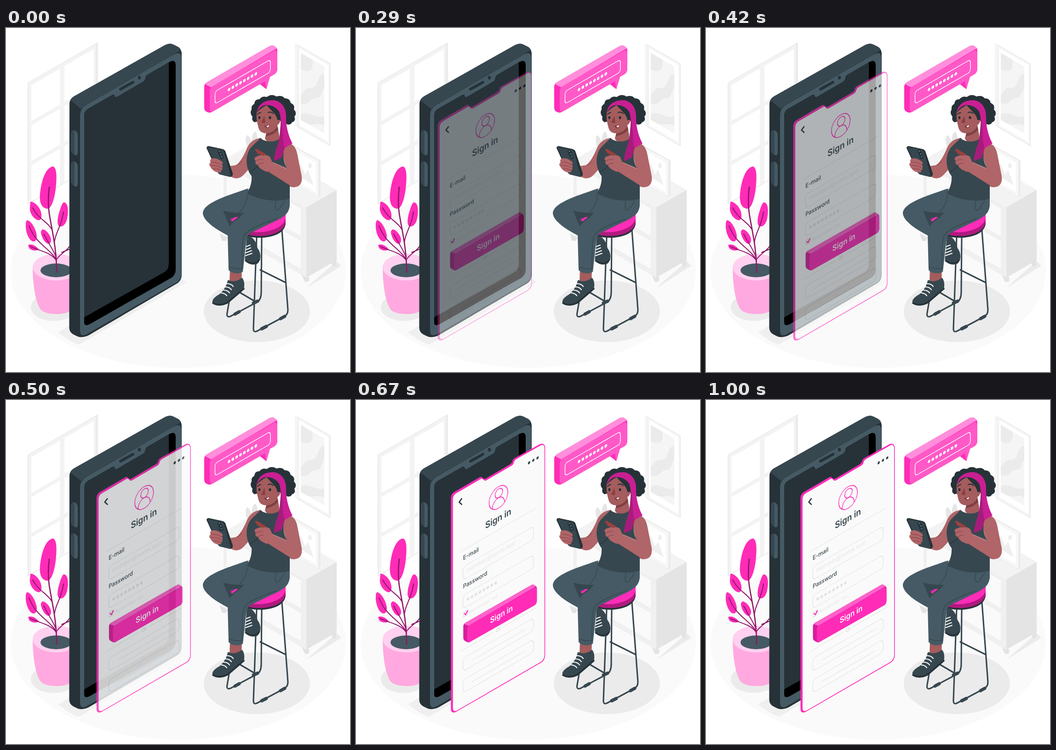
Write an HTML page that moves like this. It is 748 by 748 pixels and loops after 1040 ms.

```html
<!DOCTYPE html>
<html lang="en">
<head>
<meta charset="utf-8">
<title>Sign in</title>
<style>
html, body { margin: 0; width: 100%; height: 100%; overflow: hidden; background: #fff; }
svg { display: block; width: 100vw; height: 100vh; }
text { font-family: Inter, Roboto, sans-serif; }
.line { fill: none; stroke-linecap: round; stroke-linejoin: round; }
</style>
</head>
<body>
<svg viewBox="0 0 748 748">
<defs><clipPath id="art"><rect x="7" y="14" width="51" height="146"/></clipPath></defs>

<ellipse cx="374.500" cy="529" rx="364.500" ry="210" fill="#fafafa"/>

<!-- window -->
<g transform="translate(47 119) skewY(-30)">
  <rect width="153" height="265" fill="#ebebeb"/>
  <rect x="2" y="2" width="146" height="262" fill="#f3f3f3"/>
  <g id="panes" fill="#fff"></g>
</g>

<!-- wall picture -->
<g transform="translate(634 36) skewY(30)">
  <rect x="-6" y="0" width="8" height="180" fill="#f5f5f5"/>
  <rect width="72" height="180" fill="#ebebeb"/>
  <rect x="1" y="2" width="69" height="176" fill="#f6f6f6"/>
  <rect x="4" y="6" width="63" height="167" fill="#fff"/>
  <g clip-path="url(#art)">
    <rect x="7" y="14" width="51" height="146" fill="#f5f5f5"/>
    <path d="M7 14H32C36 36 25 48 7 50ZM58 30C40 42 48 68 28 78C16 84 12 100 7 104V124C28 118 26 100 42 92C54 84 52 66 58 62ZM7 148C24 128 40 140 58 122V142C40 146 34 158 20 160H7Z" fill="#ebebeb"/>
  </g>
</g>

<!-- cabinet -->
<path d="M655 563L719 507L729 517L660 561Z" fill="#ebebeb"/>
<path d="M642 535L660 543L658 552H650ZM705 500L719 500L717 518H710ZM464 446L482 456L478 463H470Z" fill="#e3e3e3"/>
<path d="M473 287L539 249L719 352L653 390Z" fill="#f3f3f3"/>
<path d="M473 287L653 390V543L473 440Z" fill="#f0f0f0"/>
<path d="M653 390L719 352V505L653 543Z" fill="#e4e4e4"/>
<path d="M479 299L642 392V454L479 361ZM479 370L642 463V525L479 432Z" fill="#fafafa" stroke="#ebebeb"/>
<path d="M524 258C520 246 520 236 525 233C532 238 534 247 535 253C533 240 536 228 542 225C548 232 548 247 545 257L552 244L556 262H529Z" fill="#e6e6e6"/>
<path d="M612 248L680 286L684 288V366L678 368L612 330Z" fill="#ebebeb"/>
<path d="M610 250L679 288V367L610 328Z" fill="#f7f7f7"/>
<path d="M616 260L674 293V357L616 324Z" fill="#fff"/>
<path d="M628 316L641 295L650 318L657 308L669 342Z" fill="#efefef"/>
<ellipse cx="661" cy="299" rx="4" ry="6" fill="#efefef"/>

<!-- plant -->
<ellipse cx="104" cy="607" rx="50" ry="30" fill="#ebebeb"/>
<path d="M58 518C58 556 63 590 73 609Q80 622 112 622Q136 622 145 610L160 520Z" fill="#ffa9e0"/>
<ellipse cx="109" cy="520" rx="51" ry="29" fill="#ffd0ef"/>
<ellipse cx="109" cy="527" rx="34" ry="15" fill="#455a64"/>
<g fill="#ff2cb8">
  <path d="M102 301C112 304 110 330 108 350C105 374 98 393 90 393C79 392 72 383 74 360C76 338 84 304 102 301Z"/>
  <path d="M53 378C60 376 76 390 77 405C78 414 75 418 71 418C62 417 50 403 52 389Z"/>
  <path d="M126 379C136 380 136 400 133 414C131 425 124 434 116 431C110 428 112 412 116 400C119 390 122 380 126 379Z"/>
  <path d="M46 418C54 418 66 438 67 452C67 461 64 465 58 464C48 460 42 440 43 428C43 422 44 419 46 418Z"/>
  <path d="M79 438C86 437 97 450 98 460C98 467 95 470 91 469C83 467 75 450 76 442Z"/>
  <path d="M48 472C55 468 66 474 71 481C66 486 54 484 50 478Z"/>
</g>
<g class="line" stroke="#8f1766">
  <path d="M110 531C110 480 101 445 96 415C92 395 91 370 94 346" stroke-width="2.600"/>
  <path d="M99 437C90 421 70 415 58 391M105 468C107 443 120 435 125 400M109 503C94 478 65 470 50 430M109 498C103 483 95 472 82 448M110 506C96 486 72 485 53 475M110 503C120 489 133 486 145 465M121 488L145 478" stroke-width="2"/>
</g>

<!-- phone -->
<path d="M113 662L138 647L160 672L382 545L392 553L160 688Q152 690 113 662Z" fill="#efefef"/>
<path d="M138 166C138 157 142 152 149 148L346 37C352 34 358 33 364 36L374 41C380 45 382 50 382 57V536C382 546 378 552 371 556L180 668C172 672 162 674 154 670L146 666C140 662 137.500 658 137.500 650Z" fill="#263238"/>
<path d="M140 157Q143 151 149 148L346 37Q356 32 364 36L374 41Q379 44 380 48L365 57L172 168L163 176Z" fill="#37474f"/>
<path d="M161 190Q161 176 173 168L364 58Q381 49 381 64V535Q381 546 371 553L177 665Q161 674 161 658Z" fill="#455a64"/>
<path d="M170 192Q170 181 178 176L228 147.500Q235 143 236 147Q237 153 243 149L298 117Q303 114 303 108Q304 104 308 101.500L356 73.500Q369 67 369 81V525Q369 538 358 544L182 644Q170 650 170 640Z" fill="#000"/>
<path d="M170 192Q170 181 178 176L228 147.500Q235 143 236 147Q237 153 243 149L298 117Q303 114 303 108Q304 104 308 101.500L354 74.500V512Q354 526 344 531L170 629Z" fill="#263238"/>
<path class="line" d="M249 133L276 118" stroke="#263238" stroke-width="6"/>
<ellipse cx="290" cy="108" rx="3.300" ry="4" fill="#263238"/>
<g id="keys"></g>

<!-- speech bubble -->
<path d="M431 128Q431 121 437 118L572 40Q579 36 583 39L587 42Q590 44 590 50V88Q590 97 583 101L574 106L566 133L552 122L449 182Q442 186 436 182Q431 179 431 174Z" fill="#ff2cb8"/>
<path d="M433 122Q434 120 437 118L572 40Q579 36 583 39L589 44L446 129Z" fill="#ff8edb"/>
<path d="M443 138Q443 131 449 127L580 51Q590 45 590 55V88Q590 97 583 101L574 106L566 133L563 116L452 180Q443 185 443 175Z" fill="#ff59c7"/>
<g id="bubble"></g>

<!-- stool -->
<ellipse cx="545.500" cy="616" rx="115.500" ry="67" fill="#ebebeb"/>
<g class="line" stroke="#37474f" stroke-width="3.200">
  <path d="M556 455L555 574Q555 591 546 596L488 627Q480 630 480.500 622L486 590M510 576L544 596M553 526L607 553"/>
  <path d="M545 455L538 654Q538 663 546 659L604 628Q613 624 613 613L600 440"/>
  <path d="M498 622L507 617M538 598L547 594M556 654L566 649M597 632L606 627" stroke-width="7"/>
</g>
<path d="M488 414V426C492 462 602 470 608 426V406Z" fill="#263238"/>
<path d="M488 412V421C492 459 602 466 608 422V404Z" fill="#b01a80"/>
<ellipse cx="548" cy="411" rx="60" ry="33" fill="#ff2cb8"/>

<!-- rear shoe and leg -->
<path d="M524 453C536 451 544 464 547 479C555 488 556 505 546 513C535 517 524 512 520 506C518 495 523 485 522 473Z" fill="#37474f"/>
<path class="line" d="M521 506C530 513 544 514 551 504" stroke="#263238" stroke-width="3"/>
<path class="line" d="M523 475L531 472M522 482L532 478M521 489L534 484M521 495L535 490" stroke="#fff" stroke-width="2"/>
<path d="M526 349C480 365 430 380 428 402C428 420 460 440 486 453L500 423L540 400Z" fill="#455a64"/>
<path d="M472 397C490 402 506 402 518 402L500 420L486 431Z" fill="#37474f"/>
<path d="M487 416C493 411 499 411 505 411L492 421Z" fill="#ff2cb8"/>

<!-- front leg and shoe -->
<path d="M487 524L513 526L512 552L486 554Z" fill="#a45c5d"/>
<path d="M484 548C494 554 506 549 513 543C519 549 519 560 517 568C508 578 495 588 485 597C475 605 455 606 450 599C446 592 453 585 464 579C474 570 480 560 482 549Z" fill="#37474f"/>
<path class="line" d="M450 598C461 604 476 602 485 594L517 567" stroke="#263238" stroke-width="3.500"/>
<path class="line" d="M481 556Q490 556 494 562M477 563Q486 563 490 569M473 570Q482 570 486 576M468 576Q477 577 480 582" stroke="#fff" stroke-width="2.200"/>
<path d="M528 349C552 372 590 378 617 369L617 386C615 402 608 408 590 418C570 427 548 438 530 447C524 451 523 460 521 476L515 530C505 536 490 534 484 526L482 448C481 431 495 420 512 410L520 400Z" fill="#455a64"/>
<path class="line" d="M525 364C523 385 512 402 488 417M587 375C583 392 586 400 594 394L606 376M588 415C560 424 525 438 518 451C511 470 515 500 512 525M485 519Q500 526 515 522" stroke="#37474f" stroke-width="1.500"/>

<!-- hair, head -->
<path d="M540 205Q533 200 536 193Q529 185 534 177Q533 168 540 165Q541 154 551 155Q557 147 567 150Q578 142 588 149Q600 145 606 153Q617 152 619 163Q629 167 626 177Q634 185 627 193Q631 202 622 205Q619 212 610 209L596 202L552 202Z" fill="#263238"/>
<path d="M545 187C545 175 555 166 568 167C582 168 591 180 593 191C600 194 597 208 590 211L595 238C594 253 564 252 563 239L566 229C556 229 550 224 548 213C546 204 544 196 545 187Z" fill="#a45c5d"/>
<path d="M566 229C576 229 586 223 590 213L592 221C585 229 575 234 565 235Z" fill="#7f3e42"/>
<path d="M546 184C549 170 561 165 576 166L598 182L597 200L590 200C589 187 576 180 567 168C560 171 551 177 546 184Z" fill="#263238"/>
<g class="line" stroke="#263238" stroke-width="2"><path d="M547 188Q550 184 554 184M570 184Q576 181 581 186"/></g>
<ellipse cx="551" cy="195" rx="2.400" ry="3.200" fill="#263238"/>
<ellipse cx="574" cy="195" rx="2.600" ry="3.200" fill="#263238"/>
<path d="M562 191L555 205Q558 208 564 206Z" fill="#8d3d3f"/>
<path d="M561 213Q568 213 573 210Q573 217 567 218Z" fill="#7f2f37"/>
<path d="M566 214L572 211Q572 216 568 216Z" fill="#fff"/>

<!-- arms and top -->
<path d="M555 239C537 241 528 250 522 266C515 282 508 292 501 298L482 301L486 321C497 330 508 328 516 320C524 312 535 300 535 290Z" fill="#b06568"/>
<path d="M603 248C622 248 631 258 634 277L643 322C645 338 638 348 622 346C605 342 585 326 567 311L578 292L611 307C602 285 600 265 603 248Z" fill="#b06568"/>
<path d="M553 239C563 249 585 249 594 241L606 256C601 275 603 292 611 305L579 291L568 311L617 342V371C590 380 550 374 524 360C531 348 535 335 534 322C524 310 520 288 526 272C530 258 545 250 553 239Z" fill="#37474f"/>
<path class="line" d="M531 313C540 307 548 302 550 296" stroke="#263238" stroke-width="1.300"/>
<path class="line" d="M501 298Q508 296 512 290M578 291L611 306" stroke="#8d474c" stroke-width="1.200"/>
<path d="M542 281C550 276 566 273 574 280L580 294L568 313C559 310 549 304 548 298C541 296 542 292 543 289C540 286 540 283 542 281Z" fill="#b06568"/>
<path d="M541 264Q545 261 549 265L565 274L561 278L548 274Z" fill="#9b403d"/>
<path class="line" d="M543 289Q552 285 559 286M548 298Q553 293 560 294" stroke="#8d474c" stroke-width="1.200"/>

<!-- scarf -->
<path d="M546 183C547 166 563 156 582 157C600 159 610 175 609 195C609 220 617 240 623 251L606 261L599 282L583 289C584 266 593 254 595 235C598 215 599 195 594 182C586 169 570 166 562 168C553 171 549 178 546 183Z" fill="#c91f93"/>
<path d="M598 198C603 220 600 245 606 261L599 282L583 289C584 266 593 254 595 235Z" fill="#a71c7b"/>

<!-- handset -->
<path d="M436 261Q437 256 442 257L470 263Q475 264 477 268L493 316Q494 322 488 324L467 319Q462 318 460 313Z" fill="#263238"/>
<path d="M438 259L467 264Q472 265 474 270L489 323L468 319Q463 318 461 313Z" fill="#37474f"/>
<path class="line" d="M464 268L469 281" stroke="#263238" stroke-width="8"/>
<path class="line" d="M464 268V268.100M467 274V274.100M469 280V280.100" stroke="#546e7a" stroke-width="3.500"/>
<path d="M447 284C455 281 466 287 470 291Q473 294 469 297Q473 301 470 304Q472 308 468 309Q469 314 464 314C456 315 447 308 444 301C440 296 443 294 445 292Q442 287 447 284Z" fill="#b06568"/>
<path class="line" d="M446 292Q458 291 468 297M445 299Q458 298 469 304M450 306Q458 305 467 309" stroke="#8d474c" stroke-width="1.200"/>

<!-- sign-in sheet -->
<g id="sheet">
  <path d="M205.500 213Q206 204 213 200L268 168Q272 166 274 169Q277 173 281 171L334 140Q339 137 340 131Q341 128 345 126L399 96Q409 92 410.500 103V555Q410 566 402 571L217 678Q206 683 205.500 672Z" fill="#ff2cb8"/>
  <path d="M210 216Q210 207 217 203L271 171.500Q274 170 276 173Q279 177 283 174.500L338 142.500Q342 140 343 134Q344 131 348 128.500L401 98.500Q408 95 409 104V555Q408.500 564.500 401 569.500L219 675Q211 679 210 671Z" fill="#fafafa"/>
  <path class="line" d="M229 214.500L223.500 222L229 227" stroke="#263238" stroke-width="2.600"/>
  <g id="form"></g>
  <path d="M232.500 492Q233 487 237 484.500L381 402Q384 400.500 386 402L390 404.500Q392.500 406 392.500 410V437Q392 443 388 446L246 526.500Q243 528 240 526L235 523Q232.500 521 232.500 517Z" fill="#d61f99"/>
  <path d="M234 487Q235 485.500 237 484.500L381 402Q384 400.500 386 402L391 405L244 491Z" fill="#ff62ca"/>
  <path d="M241 498Q241 493 245 490.500L386 409Q392.500 406 392.500 412V437Q392 443 388 446L246 526.500Q241 528 241 521Z" fill="#ff2cb8"/>
  <g id="label"></g>
</g>
</svg>

<script>
const $ = id => document.getElementById(id);
const GREY = '#e0e0e0', PINK = '#ff2cb8', DARK = '#37474f';

// isometric plane facing right, with its origin at x, y
const iso = (x, y, body) => `<g transform="matrix(.866 -.5 0 1 ${x} ${y})">${body}</g>`;
const box = (x, y, w, h, stroke, width = 1.2, r = 8) =>
  iso(x, y, `<rect width="${w}" height="${h}" rx="${r}" fill="none" stroke="${stroke}" stroke-width="${width}"/>`);
const rule = (x, y, w) => iso(x, y, `<path d="M0 0H${w}" stroke="${GREY}" stroke-width="1.2"/>`);
const label = (x, y, size, weight, fill, str, anchor = 'start') =>
  iso(x, y, `<text font-size="${size}" font-weight="${weight}" fill="${fill}" text-anchor="${anchor}">${str}</text>`);
const dots = (x, y, n, gap, r, fill) => iso(x, y,
  Array.from({length: n}, (_, i) => `<circle cx="${i * gap}" r="${r}" fill="${fill}"/>`).join(''));

for (let row = 0; row < 3; row++)
  for (const [x, w] of [[8, 62], [80, 64]])
    $('panes').innerHTML += `<rect x="${x}" y="${10 + row * 87}" width="${w}" height="78"/>`;

for (const y of [222, 290])
  $('keys').innerHTML += `<g transform="translate(0 ${y})">
    <path d="M141 9Q141 0 147 0Q155 2 156 10V49Q155 57 149 54Q142 51 141 43Z" fill="#37474f"/>
    <path d="M147 0Q155 2 156 10V49Q155 57 149 54V11Q149 3 147 0Z" fill="#455a64"/></g>`;

$('bubble').innerHTML = box(454.500, 138, 139, 27, '#fff', 1.6, 6) + dots(485, 133.500, 8, 9.6, 3.3, '#fff');

const avatar = `<g fill="none" stroke="${PINK}" stroke-width="1.600">
  <circle r="23.500"/><circle cx="1" cy="-9" r="9.500"/>
  <path d="M-15 18C-16 -5 16 -5 15 18"/></g>`;

$('form').innerHTML =
  dots(375.500, 136.500, 3, 10.7, 2.9, DARK) +
  iso(309, 212, avatar) +
  label(308.500, 264.500, 20, 600, DARK, 'Sign in', 'middle') +
  rule(228, 329, 187) +
  label(232, 348.500, 13, 500, DARK, 'E-mail') +
  box(232, 363, 177, 29, GREY) +
  label(239.500, 375.500, 13, 300, GREY, 'member@home.test') +
  label(232, 410.500, 13, 500, DARK, 'Password') +
  box(232, 425, 177, 29, GREY) +
  dots(243, 432.500, 8, 9.9, 3.1, GREY) +
  box(233, 462, 10, 10, '#d0d0d0', 1, 1) +
  `<path class="line" d="M235 464L237.500 467L242 458" stroke="${PINK}" stroke-width="2.200"/>` +
  label(245.500, 465, 10.5, 300, GREY, 'Remember me') +
  rule(228, 546, 81) + rule(319, 493.500, 82) +
  label(309, 503, 11.5, 400, '#d0d0d0', 'Or', 'middle') +
  [562, 609].map(y => box(232, y, 177, 28, GREY) + rule(251, y + 4, 136)).join('');

$('label').innerHTML = label(315.500, 472, 17.5, 600, '#fff', 'Sign in', 'middle');

// slide in with overshoot, held on a 24 fps beat
const LOOP = 1040, BEAT = 1000 / 24, LEAD = 35;
const slide = $('sheet').animate(
  [{opacity: 0, transform: 'translateX(-45px)'}, {opacity: 1, transform: 'translateX(0px)'}],
  {duration: 1000, easing: 'cubic-bezier(.36,-.01,.5,1.38)', fill: 'both'});
slide.pause();

const start = performance.now();
function draw() {
  const t = (performance.now() - start) % LOOP;
  const beat = Math.min(24, Math.floor((t + 4) / BEAT));
  slide.currentTime = Math.min(1000, beat * BEAT + LEAD);
  requestAnimationFrame(draw);
}
draw();
</script>
</body>
</html>
```
